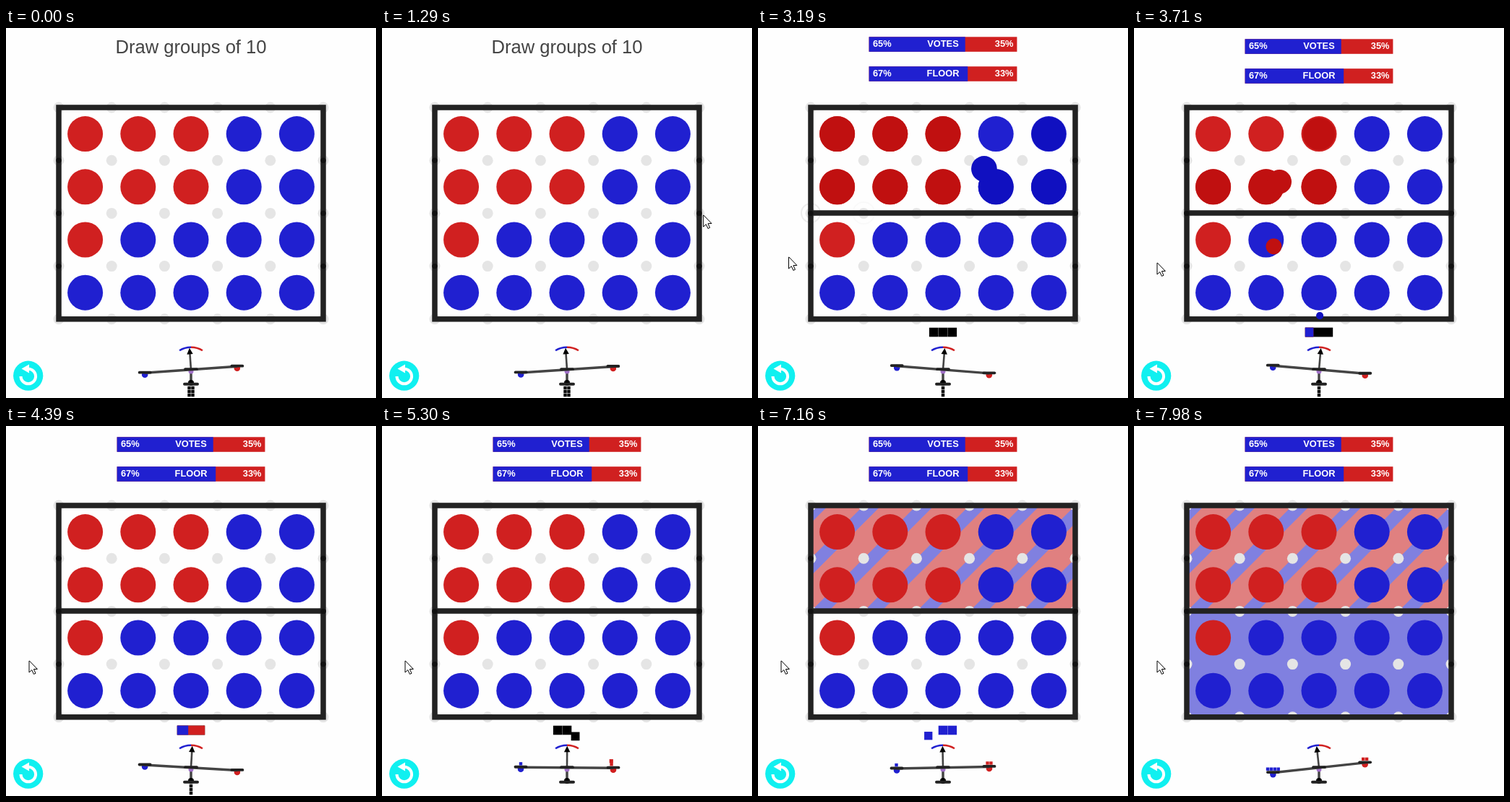
Animation, 512 px wide and 512 px high, one loop 8 s. Source, as an HTML page with a canvas:

```html
<!DOCTYPE html>
<html lang="en">
<head>
<meta charset="utf-8">
<title>Draw groups of 10</title>
<style>
html, body { margin: 0; width: 100%; height: 100%; overflow: hidden; background: #fefefe; }
canvas { display: block; width: 100vmin; height: 100vmin; }
</style>
</head>
<body>
<canvas width="512" height="512"></canvas>
<script>
const ctx = document.querySelector('canvas').getContext('2d');
const LOOP = 8000, CELL = 73.2, LEFT = 73, TOP = 110, MID = 256;
const BLUE = '#2020d0', RED = '#d02020', INK = '#222';
const DARK = { [BLUE]: '#1010c0', [RED]: '#c01010' };
const FONT = '"Liberation Sans", Arial, sans-serif';

// Each group: seats arrive, votes fly in, seats move to the scale.
const FIRST = 2547, CYCLE = 2283, FLIGHT = 300, GAP = 100;
const VOTES_AT = 590, MORPH_AT = 1850;
const PANEL = { x: 236.8, y: 414.6, w: 38.4, h: 12.8 };
const GROUPS = [
  { start: FIRST, row: 0, blue: 4, seats: [BLUE, RED, RED], from: 0 },
  { start: FIRST + CYCLE, row: 2, blue: 9, seats: [BLUE, BLUE, BLUE], from: 1 }
];

const CURSOR = [[770, 516, 296], [1050, 470, 272], [1330, 440, 257], [1450, 438, 257],
  [2220, 146, 259], [2260, 138, 271], [2370, 120, 268], [2490, 73, 258],
  [2800, 54, 292], [3190, 42, 317], [3500, 31.5, 325]];
const HITS = [1380, 1640, 1830, 2030, 2215, 2490];
const TILT = [[4390, 3.3], [4830, 1.9], [5300, 0.4], [5700, 0], [6170, -0.4],
  [6580, -0.8], [7360, -1.3], [7600, -2.8], [7980, -6.2], [8000, -6.3]];

const clamp = v => Math.max(0, Math.min(1, v));
const ramp = (t, start, length) => clamp((t - start) / length);
const mix = (a, b, p) => a + (b - a) * p;
const smooth = p => p * p * (3 - 2 * p);

function track(keys, t) {
  let i = 1;
  while (i < keys.length - 1 && keys[i][0] < t) i++;
  const [a, b] = [keys[i - 1], keys[i]];
  const p = ramp(t, a[0], b[0] - a[0]);
  return a.slice(1).map((v, k) => mix(v, b[k + 1], p));
}

function disc(x, y, r, color) {
  ctx.fillStyle = color;
  ctx.beginPath();
  ctx.arc(x, y, Math.max(0, r), 0, Math.PI * 2);
  ctx.fill();
}
function rect(x, y, w, h, color) {
  ctx.fillStyle = color;
  ctx.fillRect(x, y, w, h);
}
function block(x, y, size, color) {
  rect(x - size / 2, y - size / 2, size, size, color);
}
function line(x1, y1, x2, y2, width, color, cap = 'butt') {
  ctx.strokeStyle = color;
  ctx.lineWidth = width;
  ctx.lineCap = cap;
  ctx.beginPath();
  ctx.moveTo(x1, y1);
  ctx.lineTo(x2, y2);
  ctx.stroke();
}
function shape(points, color) {
  ctx.fillStyle = color;
  ctx.beginPath();
  points.forEach(([x, y]) => ctx.lineTo(x, y));
  ctx.closePath();
  ctx.fill();
}
function label(text, x, y, font, color, align) {
  ctx.font = `${font} ${FONT}`;
  ctx.fillStyle = color;
  ctx.textAlign = align;
  ctx.textBaseline = 'alphabetic';
  ctx.fillText(text, x, y);
}

const isRed = (col, row) => row < 2 ? col < 3 : row === 2 && col === 0;
const center = (col, row) => [LEFT + CELL * (col + 0.5), TOP + CELL * (row + 0.5)];

// Voters in snake order, blue before red.
GROUPS.forEach(g => {
  const cells = [];
  for (let i = 0; i < 10; i++) {
    const second = i > 4;
    const col = second ? 9 - i : i, row = g.row + (second ? 1 : 0);
    const [x, y] = center(col, row);
    cells.push({ x, y, color: isRed(col, row) ? RED : BLUE });
  }
  g.voters = [BLUE, RED].flatMap(c => cells.filter(v => v.color === c));
});

function drawFill(g, t) {
  const alpha = ramp(t, g.start + CYCLE + 510, 90);
  if (!alpha) return;
  const y = TOP + g.row * CELL, w = CELL * 5, h = CELL * 2;
  const share = CELL * g.seats.filter(c => c === BLUE).length / 3;
  ctx.save();
  ctx.globalAlpha = alpha;
  ctx.beginPath();
  ctx.rect(LEFT, y, w, h);
  ctx.clip();
  rect(LEFT, y, w, h, share < CELL ? '#e08080' : '#8080e0');
  if (share < CELL) {
    for (let i = 0; i < 7; i++) {
      const x = LEFT + i * CELL;
      shape([[x, y], [x + share, y], [x + share - h, y + h], [x - h, y + h]], '#8080e0');
    }
  }
  ctx.restore();
}

function drawBoard(t) {
  GROUPS.forEach(g => drawFill(g, t));
  for (let r = 0; r < 5; r++)
    for (let c = 0; c < 6; c++) disc(LEFT + c * CELL, TOP + r * CELL, 7.5, '#e5e5e5');
  for (let r = 0; r < 4; r++)
    for (let c = 0; c < 5; c++) disc(...center(c, r), 24.5, isRed(c, r) ? RED : BLUE);

  HITS.forEach((hit, i) => {
    const age = t - hit;
    if (age < 0 || age > 1100) return;
    ctx.strokeStyle = `rgba(130,130,130,${0.4 * (1 - age / 1100)})`;
    ctx.lineWidth = 2;
    ctx.beginPath();
    ctx.arc(LEFT + (5 - i) * CELL, MID, 8 + age / 140, 0, Math.PI * 2);
    ctx.stroke();
  });

  const hits = HITS.filter(h => t >= h).length;
  if (hits) {
    const x = LEFT + (6 - hits) * CELL;
    if (hits < 6) {
      const [cx, cy] = track(CURSOR, t);
      line(x, MID, mix(x, cx + 4, 0.95), mix(MID, cy, 0.95), 7.5, '#666', 'round');
    }
    line(LEFT + 5 * CELL, MID, x, MID, 7.5, INK, 'round');
  }
  ctx.strokeStyle = INK;
  ctx.lineWidth = 7.5;
  ctx.lineJoin = 'miter';
  ctx.strokeRect(LEFT, TOP, CELL * 5, CELL * 4);
  for (let r = 1; r < 4; r++)
    [LEFT, LEFT + CELL * 5].forEach(x => disc(x, TOP + r * CELL, 3.7, '#111'));
}

function drawHeading(t) {
  const up = ramp(t, 2530, 300);
  if (up < 1) label('Draw groups of 10', MID, 35 - 50 * up * up, '25.6px', '#444', 'center');
  const p = ramp(t, 2620, 857);
  if (!p) return;
  const shift = -80 * (1 - p) ** 3;
  [['VOTES', 65, 15.3], ['FLOOR', 66.7, 56.2]].forEach(([name, share, top]) => {
    const x = 153.6, w = 204.8, y = top + shift, percent = Math.round(share);
    rect(x, y, w, 20.5, RED);
    rect(x, y, w * share / 100, 20.5, BLUE);
    const text = (s, tx, align) => label(s, tx, y + 14, 'bold 12.8px', '#fff', align);
    text(percent + '%', 159, 'left');
    text(name, MID, 'center');
    text(100 - percent + '%', 353.4, 'right');
  });
}

// Seats waiting under the scale, then flying up to the panel.
function drawSupply(t) {
  GROUPS.forEach((g, n) => {
    const x = n ? mix(258.5, MID, ramp(t, FIRST, FLIGHT)) : 253.5;
    for (let i = 0; i < 3; i++) {
      const p = ramp(t, g.start + GAP * i, FLIGHT);
      if (p === 1) continue;
      block(mix(x, PANEL.x + 12.8 * (i + 0.5), p), mix(498 + 5 * i, 421, p),
        mix(4.4, 12.6, p), '#000');
    }
  });
}

function drawPanel(g, t) {
  const local = t - g.start, { x, y, w, h } = PANEL;
  const landed = Math.floor((local - VOTES_AT - FLIGHT) / GAP) + 1;
  if (landed < 1) {
    for (let i = 0; i < 3; i++)
      if (local >= GAP * i + FLIGHT) block(x + 12.8 * (i + 0.5), 421, 12.6, '#000');
  } else if (local < CYCLE) {
    const seatShare = g.seats.filter(c => c === BLUE).length / 3;
    const split = mix(g.blue / 10, seatShare, smooth(ramp(local, MORPH_AT, 350)));
    const filled = Math.min(10, landed) / 10;
    rect(x, y, w, h, '#000');
    rect(x, y, w * filled, h, RED);
    rect(x, y, w * Math.min(split, filled), h, BLUE);
  }
}

function drawVotes(g, t) {
  const local = t - g.start;
  if (local < VOTES_AT - 70) return;
  [...g.voters].map((v, i) => [v, i]).reverse().forEach(([v, i]) => {
    const p = (local - VOTES_AT - GAP * i) / FLIGHT;
    if (p > 1.2) return;
    const move = clamp(p);
    disc(mix(v.x, PANEL.x + 3.84 * (i + 0.5), move), mix(v.y, 415, move),
      Math.min(24.5, 21 - 17.4 * p), DARK[v.color]);
  });
}

function tiltAt(t) {
  return t < 4390 ? -5 * Math.cos((t - 600) / 6000 * Math.PI * 2) : track(TILT, t)[0];
}

function drawScale(t) {
  const angle = tiltAt(t) * Math.PI / 180, py = 472.8;
  const dx = 64 * Math.cos(angle), dy = 64 * Math.sin(angle);
  const pans = { [BLUE]: [MID - dx, py - dy], [RED]: [MID + dx, py + dy] };

  [[BLUE, -1], [RED, 1]].forEach(([color, side]) => {
    ctx.strokeStyle = color;
    ctx.lineWidth = 2.4;
    ctx.lineCap = 'butt';
    ctx.beginPath();
    ctx.arc(MID, py, 31, -Math.PI / 2, -Math.PI / 2 + side * 0.54, side < 0);
    ctx.stroke();
  });
  line(MID, py, MID, 491, 3.5, '#444');
  disc(MID, 491, 4, '#000');
  line(247, 492.7, 265, 492.7, 4, INK, 'round');
  disc(MID, 475, 3.5, '#a070c8');

  Object.entries(pans).forEach(([color, [x, y]]) => disc(x, y + 2.4, 4.3, color));
  ctx.save();
  ctx.translate(MID, py);
  ctx.rotate(angle);
  line(-64, 0, 64, 0, 3.5, '#444');
  line(0, 0, 0, -24, 2.6, '#444');
  shape([[0, -30], [4.2, -21.5], [-4.2, -21.5]], '#000');
  ctx.restore();
  line(248, 472.2, 264, 472.2, 3.8, INK, 'round');
  Object.values(pans).forEach(([x, y]) => line(x - 7.5, y - 0.6, x + 7.5, y - 0.6, 3.8, INK, 'round'));

  const blueCount = mix(1, 4, smooth(ramp(t, FIRST + 2 * CYCLE, FLIGHT)));
  GROUPS.forEach(g => g.seats.forEach((color, i) => {
    const leave = g.start + CYCLE;
    if (t < leave) return;
    const p = ramp(t, leave + GAP * i, FLIGHT);
    const place = color === BLUE ? i + g.from : i - 1;
    const count = color === BLUE ? blueCount : 2;
    const [x, y] = pans[color];
    block(mix(PANEL.x + 12.8 * (i + 0.5), x + (place - (count - 1) / 2) * 4.9, p),
      mix(421, y - 5, p), mix(12.6, 4.4, p), color);
  }));
}

function drawButton() {
  disc(30.7, 481.2, 20.6, '#10f0f0');
  ctx.strokeStyle = '#fff';
  ctx.lineWidth = 4;
  ctx.lineCap = 'butt';
  ctx.beginPath();
  ctx.arc(30.8, 482, 10.3, -Math.PI / 2, Math.PI);
  ctx.stroke();
  shape([[21.5, 471.5], [32, 465.5], [32, 477.5]], '#fff');
}

function drawCursor(t) {
  if (t < CURSOR[0][0]) return;
  const [x, y] = track(CURSOR, t);
  ctx.save();
  ctx.translate(x + 0.5, y);
  shape([[0, 0], [0, 16], [3.8, 12.6], [6.4, 18.4], [9, 17.2], [6.4, 11.6], [11, 11.4]], '#fff');
  ctx.strokeStyle = '#000';
  ctx.lineWidth = 1;
  ctx.stroke();
  ctx.restore();
}

function draw(t) {
  rect(0, 0, 512, 512, '#fefefe');
  drawBoard(t);
  drawHeading(t);
  drawButton();
  GROUPS.forEach(g => drawPanel(g, t));
  drawSupply(t);
  drawScale(t);
  GROUPS.forEach(g => drawVotes(g, t));
  drawCursor(t);
}

const begin = performance.now();
function tick() {
  draw((performance.now() - begin) % LOOP);
  requestAnimationFrame(tick);
}
tick();
</script>
</body>
</html>
```
